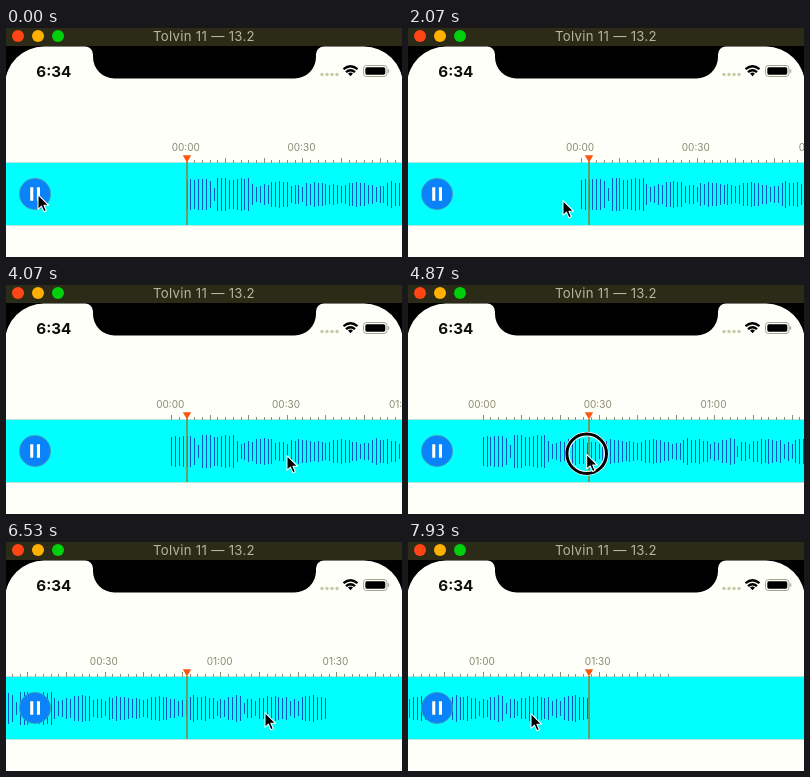
Write an HTML page that moves like this. It is 396 px wide and 229 px high and loops after 8000 ms.

```html
<!DOCTYPE html>
<html lang="en">
<head>
<meta charset="utf-8">
<title>Audio timeline</title>
<style>
  html, body { margin: 0; width: 100%; height: 100%; overflow: hidden; background: #000; }
  svg { display: block; width: 396px; height: 229px; }
  text { font-family: Inter, Roboto, sans-serif; text-anchor: middle; }
  .label { font-size: 10px; fill: #8b8a70; }
  #strip path { shape-rendering: crispEdges; stroke-width: 1; }
</style>
</head>
<body>
<svg viewBox="0 0 396 229" xmlns="http://www.w3.org/2000/svg">
  <!-- window and screen -->
  <rect width="396" height="229" fill="#000"/>
  <rect width="396" height="18" fill="#2c2b18"/>
  <circle cx="12" cy="8" r="6" fill="#ff4515"/>
  <circle cx="32" cy="8" r="6" fill="#ffb000"/>
  <circle cx="52" cy="8" r="6" fill="#00cf0c"/>
  <text x="198" y="13" font-size="13.2" letter-spacing=".3" fill="#b8b69c">Tolvin 11 — 13.2</text>
  <path fill="#fffffa" d="M-1 229V57A39 39 0 0 1 38 18.5H79A8 8 0 0 1 87 26.5V29A21.5 21.5 0 0 0 108.5 50.5H288.5A21.5 21.5 0 0 0 310 29V26.5A8 8 0 0 1 318 18.5H358A39 39 0 0 1 397 57V229Z"/>

  <!-- status bar -->
  <text x="47.8" y="48.5" font-size="15.2" font-weight="650" fill="#0c0c08">6:34</text>
  <g fill="#c9c8a6">
    <circle cx="316" cy="46.5" r="1.7"/><circle cx="321" cy="46.5" r="1.7"/>
    <circle cx="326" cy="46.5" r="1.7"/><circle cx="331" cy="46.5" r="1.7"/>
  </g>
  <g fill="none" stroke="#000" stroke-width="2.3">
    <path d="M337.5 41.2Q344.5 35.2 351.5 41.2"/>
    <path d="M340 44.2Q344.5 40.2 349 44.2"/>
    <path d="M342 45.6Q344.5 43.6 347 45.6L344.5 48.3Z" fill="#000" stroke="none"/>
  </g>
  <rect x="357.5" y="37.5" width="23.5" height="11" rx="3" fill="none" stroke="#a5a494"/>
  <rect x="359.3" y="39.3" width="20" height="7.4" rx="1.6" fill="#000"/>
  <path d="M382.3 41.3Q384 43 382.3 44.8Z" fill="#a5a494" stroke="#a5a494" stroke-width=".6"/>

  <!-- track -->
  <rect y="134" width="396" height="64" fill="#b5e8da"/>
  <rect y="135" width="396" height="62" fill="#0ff"/>
  <g id="strip"></g>
  <path d="M181 134V197" stroke="#858642" stroke-width="1.6"/>
  <path d="M176.8 127.2H185.2L181 134.4Z" fill="#ff5410"/>
  <circle cx="29" cy="166" r="15.7" fill="#0a82fa" stroke="#4aa5ae" stroke-width=".8"/>
  <path d="M24.2 159.3h3.1v13.4h-3.1zM30.9 159.3h3.1v13.4h-3.1z" fill="#fff"/>

  <g id="pointer">
    <g id="ring" fill="none">
      <circle r="19.6" stroke="#fffffa" stroke-width="4.6"/>
      <circle r="19.8" stroke="#000" stroke-width="3"/>
    </g>
    <path transform="translate(0 .6) scale(.93)" d="M0 0V15.8L3.7 12.4L6.4 18.5L9 17.4L6.4 11.4H11.3Z" fill="#000" stroke="#fff" stroke-width="1.1" stroke-linejoin="round"/>
  </g>
</svg>
<script>
const LOOP = 8000;
const SECOND = 3.86;      // pixels per second of sound
const LENGTH = 87.4;      // seconds of sound
const HEAD = 181;         // x of the playhead
const $ = id => document.getElementById(id);
const strip = $('strip'), pointer = $('pointer'), ring = $('ring');

// Pointer moves; a drag also scrolls by that many seconds of sound.
const moves = [
  { start: 1870, end: 2060, x: 155, y: 172 },
  { start: 2760, end: 3400, x: 281, y: 170 },
  { start: 4440, end: 4860, x: 178.7, y: 168.7, drag: 23.4 },
  { start: 5000, end: 5330, x: 285, y: 170 },
  { start: 5960, end: 6320, x: 190, y: 171, drag: 21.8 },
  { start: 6360, end: 6530, x: 259, y: 170 },
  { start: 7130, end: 7600, x: 108, y: 176, drag: 35.2 },
  { start: 7800, end: 7930, x: 123, y: 171 }
];

function draw(tag, attrs, text) {
  const node = document.createElementNS('http://www.w3.org/2000/svg', tag);
  for (const key in attrs) node.setAttribute(key, attrs[key]);
  if (text) node.textContent = text;
  strip.append(node);
}

function noise(i) {
  const v = Math.sin(i * 12.9898 + 4) * 43758.5453;
  return (v - Math.floor(v)) * 2 - 1;
}

// Half height of a bar: a loud opening, then slow swells with two near pauses.
function level(i) {
  const swell = 10.8 + 2 * Math.cos((i - 24) * Math.PI / 5);
  const h = (i < 17 ? 15 : swell) + 1.4 * noise(i);
  return i === 7 || i === 66 ? h * 0.4 : h;
}

const ease = (t, start, end) => {
  const p = Math.min(1, Math.max(0, (t - start) / (end - start)));
  return p * p * (3 - 2 * p);
};

// Playback advances one second at a time, each in a short slide.
function played(t) {
  const s = Math.floor((t - 930) / 1000);
  return s < 0 ? 0 : s + ease(t, 930 + s * 1000, 1070 + s * 1000);
}

let ticks = '', bars = '';
for (let s = 0; s <= 108; s += 2) ticks += `M${s * SECOND} ${s % 10 ? 132 : 130}V135`;
for (let s = 0; s < LENGTH; s++) bars += `M${s * SECOND} ${166.5 - level(s)}V${166.5 + level(s)}`;
draw('path', { d: ticks, stroke: '#8f8e76' });
draw('path', { d: bars, stroke: '#0858c4' });

['00:00', '00:30', '01:00', '01:30'].forEach((label, i) =>
  draw('text', { class: 'label', x: i * 30 * SECOND - 1.3, y: 123.3 }, label));

function frame() {
  const t = performance.now() % LOOP;
  let x = 32, y = 166, position = played(t), down = false;
  for (const m of moves) {
    const p = ease(t, m.start, m.end);
    x += (m.x - x) * p;
    y += (m.y - y) * p;
    if (m.drag) {
      position += m.drag * p;
      down ||= t > m.start - 20 && t < m.end + 60;
    }
  }
  strip.setAttribute('transform', `translate(${HEAD - Math.min(position, LENGTH) * SECOND} 0)`);
  pointer.setAttribute('transform', `translate(${x} ${y})`);
  ring.setAttribute('visibility', down ? 'visible' : 'hidden');
  requestAnimationFrame(frame);
}
frame();
</script>
</body>
</html>
```
